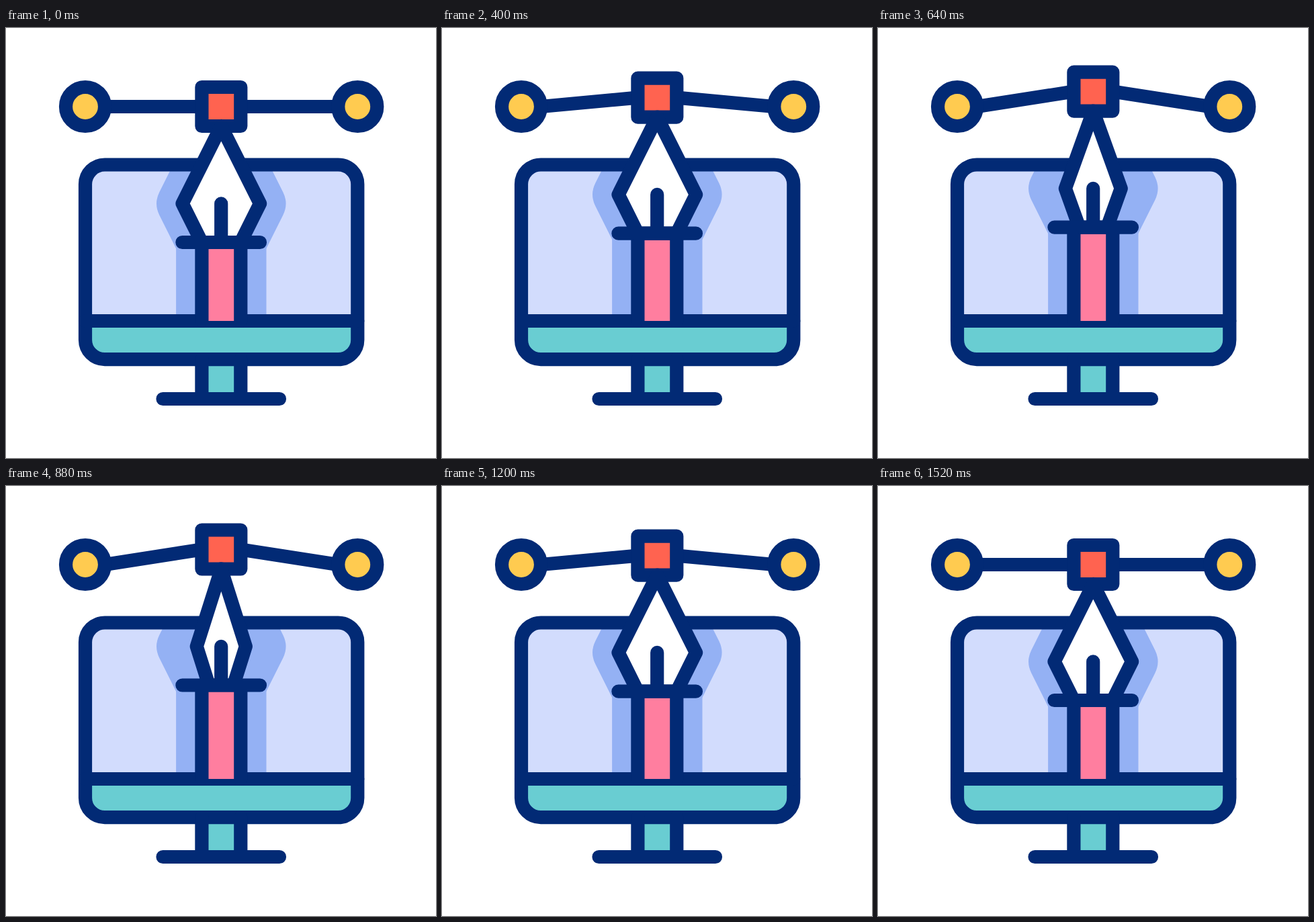
Animation of 640 by 640 pixels, one loop 2 s. Source, as an HTML page:

```html
<!DOCTYPE html>
<html lang="en">
<head>
<meta charset="utf-8">
<title>Pen tool on a monitor</title>
<style>
  html, body { margin: 0; width: 100%; height: 100%; overflow: hidden; background: #fff; }
  svg { display: block; width: 100%; height: 100%; }
  .ink { stroke: #022a75; stroke-width: 20.2; stroke-linecap: round; stroke-linejoin: round; fill: none; }
  .shade { stroke: #94b1f4; stroke-width: 76.5; stroke-linejoin: round; fill: #94b1f4; }
</style>
</head>
<body>
<svg viewBox="0 0 640 640">
  <defs>
    <clipPath id="screen"><rect x="118" y="203.5" width="405" height="232.5"/></clipPath>
  </defs>

  <!-- monitor -->
  <rect x="118" y="203.5" width="405.3" height="289.7" rx="29" fill="#d2dcfd"/>
  <g clip-path="url(#screen)">
    <path id="nibShade" class="shade"/>
    <path id="bodyShade" fill="#94b1f4"/>
  </g>
  <path d="M118 436H523.3V464.2a29 29 0 0 1-29 29H147a29 29 0 0 1-29-29Z" fill="#69cdd2"/>
  <rect x="291.4" y="493" width="58" height="59" fill="#69cdd2"/>
  <rect class="ink" x="118" y="203.5" width="405.3" height="289.7" rx="29"/>
  <path class="ink" d="M118 436H523.3M291.4 493V552M349.3 493V552M233.5 552H407"/>

  <!-- pen body -->
  <path id="body" fill="#ff7e9f"/>
  <path id="sides" class="ink"/>

  <!-- handles -->
  <path id="arms" class="ink"/>
  <circle class="ink" cx="118" cy="117" r="29" style="fill:#ffcb50"/>
  <circle class="ink" cx="523.3" cy="117" r="29" style="fill:#ffcb50"/>

  <!-- anchor and nib -->
  <g id="head">
    <rect class="ink" x="291.4" y="88" width="57.9" height="58" style="fill:#ff6350"/>
    <path id="nib" class="ink" style="fill:#fff"/>
    <path class="ink" d="M320.2 261.3V319M262.4 319H378"/>
  </g>
</svg>
<script>
  const LOOP = 2000, MID = 800, CX = 320.3;
  const LIFT = 22.5, SQUEEZE = 0.38;
  const el = id => document.getElementById(id);
  const put = (id, d) => el(id).setAttribute('d', d);

  function ease(u) {
    u = Math.min(1, Math.max(0, u));
    return u < 0.5 ? 4 * u ** 3 : 1 - 4 * (1 - u) ** 3;
  }

  function nibPath(k, dy) {
    const wide = 57.8 * k, narrow = 29 * k;
    return `M${CX} ${146 + dy}L${CX + wide} ${261.3 + dy}L${CX + narrow} ${319 + dy}` +
      `H${CX - narrow}L${CX - wide} ${261.3 + dy}Z`;
  }

  function draw(ms) {
    // the way back mirrors the way up
    const t = MID - Math.abs((ms % LOOP) - MID);
    const dy = -LIFT * ease((t - 80) / 600);
    const k = 1 - SQUEEZE * ease((t - 400) / 400);
    const bar = 319 + dy, y = 117 + dy;

    el('head').setAttribute('transform', `translate(0 ${dy})`);
    put('nib', nibPath(k, 0));
    put('nibShade', nibPath(1, dy));
    put('bodyShade', `M253.1 ${bar}H387.5V436H253.1Z`);
    put('body', `M291.4 ${bar}H349.3V436H291.4Z`);
    put('sides', `M291.4 ${bar}V436M349.3 ${bar}V436`);
    put('arms', `M147 117L291.4 ${y}M494.3 117L349.3 ${y}`);
  }

  let start;
  function tick(now) {
    start ??= now;
    draw(Math.max(0, now - start));
    requestAnimationFrame(tick);
  }
  draw(0);
  requestAnimationFrame(tick);
</script>
</body>
</html>
```
